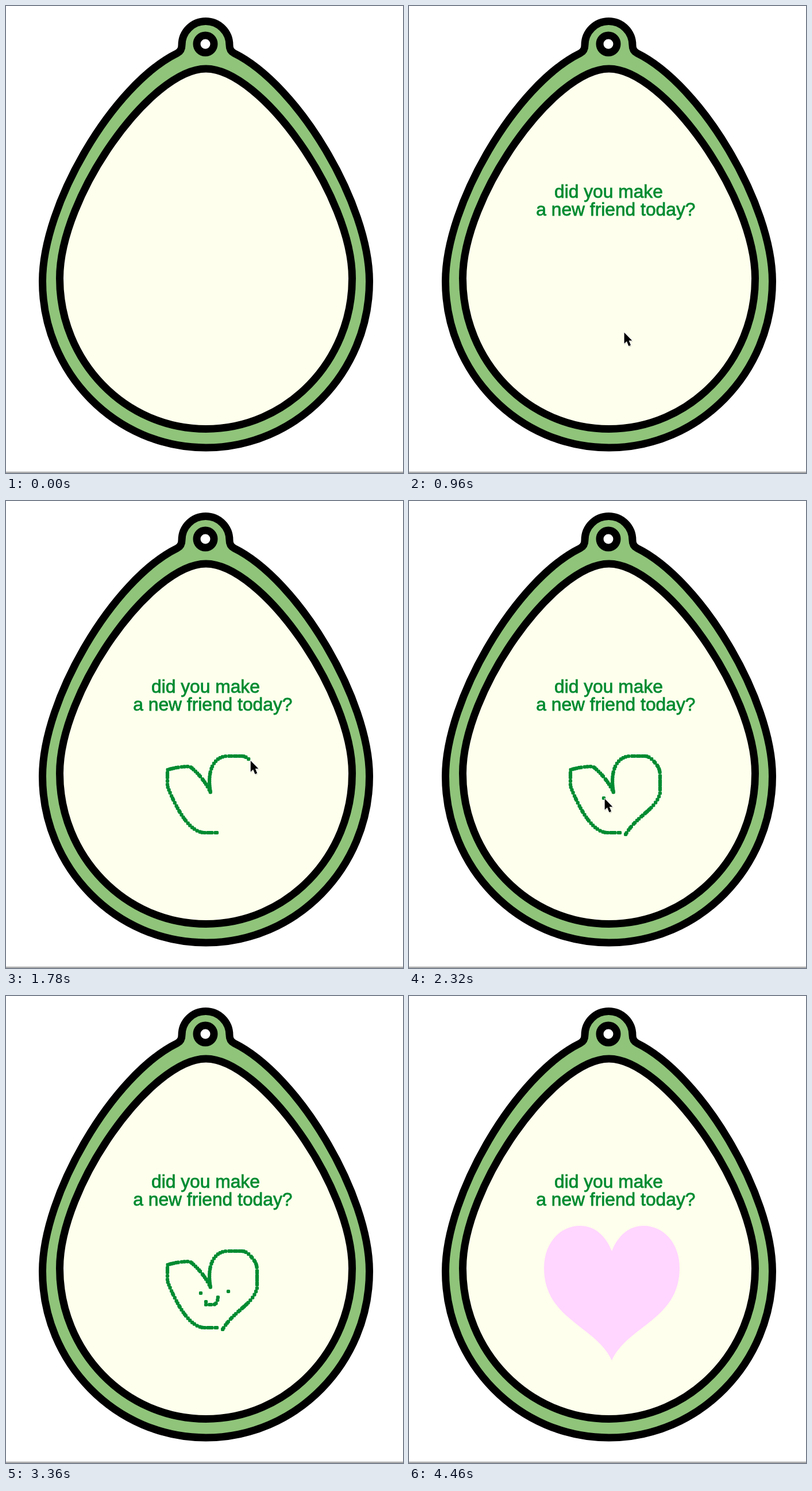
Recreate the animation shown at these times as an HTML page. Size 691 by 811 pixels, loop 4480 ms.

```html
<!DOCTYPE html>
<html lang="en">
<head>
<meta charset="utf-8">
<title>New friend</title>
<style>
  html, body { margin: 0; width: 100%; height: 100%; overflow: hidden; background: #fff; }
  svg { display: block; width: 100vw; height: 100vh; }
  text { font: 31.75px "Liberation Sans", Arial, sans-serif; stroke: #008b31; stroke-width: .8; }
  .green { fill: #008b31; }
  .rim { stroke: #000; stroke-width: 13; stroke-linejoin: round; }
</style>
</head>
<body>
<svg viewBox="0 0 691 811">
  <rect width="691" height="811" fill="#fff"/>
  <path class="rim" fill="#8fc47a" d="M63.5 478C63.5 345 186 137 298 82Q306 78 306 68A41.5 41.5 0 0 1 389 68Q389 78 397 82C509 137 632.5 345 632.5 478C632.5 637 505 767 348 767S63.5 637 63.5 478Z"/>
  <path class="rim" fill="#feffec" d="M93.5 473C93.5 331 252 109 348 109S602.500 331 602.500 473C602.500 617 488.500 734.500 348 734.500S93.500 617 93.500 473Z"/>
  <circle cx="347" cy="66" r="15" fill="#fff" stroke="#000" stroke-width="13"/>
  <rect y="809" width="691" height="1.2" fill="#6c6c6c"/>
  <g id="words" class="green">
    <text x="253" y="333">did you make</text>
    <text x="221.300" y="364.300">a new friend today?</text>
  </g>
  <g id="ink" class="green"></g>
  <path id="heart" fill="#ffd6ff" d="M353 443C342 415 322 399 298 399C262 399 235 430 235 472C235 562 325 572 353 633C381 572 471 562 471 472C471 430 444 399 408 399C384 399 364 415 353 443Z"/>
  <g id="pointer">
    <path d="M.5 2.500V23L5.500 19L9 27L13 25.500L10 17.500H16Z" opacity=".18"/>
    <path d="M.6 1.600V20.800L5 16.800L8.300 25L12 23.400L8.700 15.500H14.200Z" stroke="#fff" stroke-width="1.6" paint-order="stroke"/>
  </g>
</svg>
<script>
const LOOP = 4480, WORDS_AT = 480, HEART_AT = 3560, HIDE_AT = 3000;
const NS = "http://www.w3.org/2000/svg";
const $ = id => document.getElementById(id);

function make(tag, attrs) {
  const el = document.createElementNS(NS, tag);
  for (const name in attrs) el.setAttribute(name, attrs[name]);
  return el;
}

// One sweep of the hand along a path, with or without ink
function sweep(t0, t1, d, inked = true) {
  const path = make("path", { d }), len = path.getTotalLength();
  return { t0, t1, len, inked, at: k => path.getPointAtLength(len * k) };
}

const outline = "M367 576H346C318 576 296 531 284 503L281 495V467Q300 461 320 461Q343 479 356 506" +
  "C349 468 362 443 386 443H412Q422 445 430 457Q437 464 437 477V507C430 536 398 545 377 579";
const sweeps = [
  sweep(640, 960, "M425 640L373 566", false),
  sweep(1060, 2080, outline),
  sweep(2270, 2340, "M339 516h.1"),
  sweep(2470, 2530, "M387 513h.1"),
  sweep(2640, 2840, "M348 531V536H361Q369 535 369 520")
];

let seed = 7;
function random() {
  seed = seed * 16807 % 2147483647;
  return seed / 2147483647;
}

// Uneven beads of ink, each with the time the pen reaches it
const dots = [];
for (const s of sweeps.filter(s => s.inked)) {
  for (let d = 0; d <= s.len; d += 2.5 + 4 * random()) {
    const k = d / s.len, { x, y } = s.at(k);
    const el = make("rect", { x: x - 3.1, y: y - 3.1, width: 6.2, height: 6.2, rx: 1.8 });
    $("ink").append(el);
    dots.push({ el, t: s.t0 + (s.t1 - s.t0) * k });
  }
}

function pointerAt(t) {
  const i = sweeps.findIndex(s => t < s.t1);
  if (i < 0) return sweeps[sweeps.length - 1].at(1);
  const s = sweeps[i];
  if (t >= s.t0 || !i) return s.at(Math.max(0, (t - s.t0) / (s.t1 - s.t0)));
  // Glide between sweeps
  const last = sweeps[i - 1], a = last.at(1), b = s.at(0);
  const k = (t - last.t1) / (s.t0 - last.t1), e = k * k * (3 - 2 * k);
  return { x: a.x + (b.x - a.x) * e, y: a.y + (b.y - a.y) * e };
}

function show(el, on) { el.style.display = on ? "" : "none"; }

function draw(t) {
  show($("words"), t >= WORDS_AT);
  show($("heart"), t >= HEART_AT);
  show($("ink"), t < HEART_AT);
  show($("pointer"), t >= sweeps[0].t0 && t < HIDE_AT);
  for (const d of dots) show(d.el, t >= d.t);
  const { x, y } = pointerAt(t);
  $("pointer").setAttribute("transform", `translate(${x + 1} ${y - 0.5})`);
}

const start = performance.now();
function tick(now) {
  draw(Math.max(0, now - start) % LOOP);
  requestAnimationFrame(tick);
}
draw(0);
requestAnimationFrame(tick);
</script>
</body>
</html>
```
